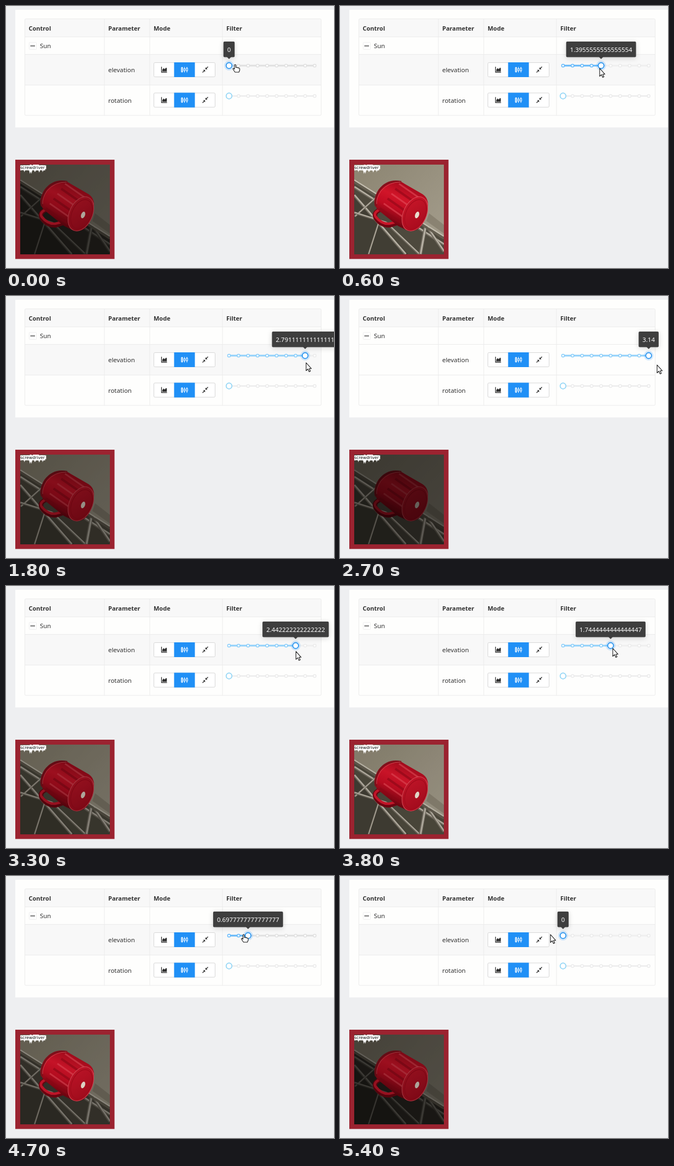
Recreate the animation shown at these times as an HTML page. Size 600 px wide and 479 px high, loop 5.5 s.

```html
<!DOCTYPE html>
<html lang="en">
<head>
<meta charset="utf-8">
<title>Light filter</title>
<style>
  html, body { margin: 0; width: 100%; height: 100%; overflow: hidden; background: #eeeff1; }
  svg { display: block; width: 600px; height: 479px; }
  text { font: 11.4px "Noto Sans", "Open Sans", sans-serif; fill: #303030; }
  .head text { font-size: 11px; font-weight: 600; }
  .line { fill: none; stroke: #ebebeb; }
  .rail { stroke: #efefef; stroke-width: 3; stroke-linecap: round; }
  .hover .rail { stroke: #e0e0e0; }
  .track { stroke: #91d2fc; stroke-width: 3; stroke-linecap: round; }
  .dot { fill: #fff; stroke: #ebebeb; stroke-width: 1.5; }
  .hover .dot { stroke: #e0e0e0; }
  .dot.on { stroke: #8acefa; }
  .strong .track, .strong .dot.on { stroke: #64b9fb; }
  .handle { fill: #fff; stroke: #91d5f5; stroke-width: 1.7; }
  .bubble { filter: drop-shadow(0 2px 5px rgba(0, 0, 0, .16)); }
  .bubble text { fill: #fff; }
  .pointer path { fill: #fff; stroke: #161616; stroke-width: 1.1; stroke-linejoin: round; }
  .label { font: 7.7px "DejaVu Sans", sans-serif; fill: #111; stroke: #fff; stroke-width: 5; paint-order: stroke; }
</style>
</head>
<body>
<svg viewBox="0 0 600 479">
  <defs>
    <clipPath id="photo"><rect x="26" y="290" width="164" height="164"/></clipPath>
    <path id="body" d="M96 320Q108 318 118 325L151 344Q162 351 161 367Q159 391 146 405Q136 414 124 411L106 402L71 374Q62 367 65 354Q71 328 96 320Z"/>
    <clipPath id="bodyClip"><use href="#body"/></clipPath>
    <linearGradient id="enamel" gradientUnits="userSpaceOnUse" x1="116" y1="325" x2="86" y2="392">
      <stop offset="0" stop-color="#a50b1c"/><stop offset=".35" stop-color="#cb1428"/>
      <stop offset=".65" stop-color="#b90c20"/><stop offset="1" stop-color="#6e0510"/>
    </linearGradient>
    <linearGradient id="surface" gradientUnits="userSpaceOnUse" x1="60" y1="290" x2="180" y2="410">
      <stop offset="0" stop-color="#8e8774"/><stop offset="1" stop-color="#a19a89"/>
    </linearGradient>
    <linearGradient id="base" x1="0" y1="0" x2="1" y2="1">
      <stop offset="0" stop-color="#c51629"/><stop offset="1" stop-color="#9f0a1b"/>
    </linearGradient>
    <g id="modes">
      <rect x="270.5" y="103.5" width="112" height="26" rx="2" fill="#fff" stroke="#d6d6d6"/>
      <rect x="307.5" y="103" width="38" height="27" fill="#2090f6"/>
      <path d="M284.5 111v10h10" fill="none" stroke="#303030" stroke-width="1.3"/>
      <path d="M286 119.5v-3l2.3-3 2 2 2.7-3 1.2 1.6v5.4Z" fill="#303030"/>
      <g fill="none" stroke="#fff">
        <path d="M322 111.5v10M326.5 111.5v3m0 4v3M331 111.5v2m0 5v3"/>
        <path d="M320.8 112.5h2.4v8h-2.4ZM325.3 114.5h2.4v4h-2.4ZM329.8 113.5h2.4v5h-2.4Z"/>
      </g>
      <path d="M369.5 111l-3.8 3.8M359.5 121.5l3.8-3.8" stroke="#303030" stroke-width="1.3"/>
      <path d="M364.8 112v3.7h3.7ZM364.2 120.5v-3.7h-3.7Z" fill="#303030"/>
    </g>
  </defs>

  <rect width="600" height="479" fill="#eeeff1"/>
  <rect x="17" y="7" width="583" height="215" fill="#fefefd"/>
  <rect x="34" y="24" width="542" height="32" fill="#f8f8f8"/>
  <rect id="row" x="34" y="89" width="542" height="55" fill="#f8f8f8"/>
  <rect class="line" x="34.5" y="23.5" width="542" height="176.5" rx="2"/>
  <path class="line" d="M34 56.5H576M34 88.5H576M34 144.5H576M180 24V200M263 24V200M396 24V200"/>
  <g class="head">
    <text x="41.5" y="45">Control</text><text x="187" y="45">Parameter</text>
    <text x="270" y="45">Mode</text><text x="403" y="45">Filter</text>
  </g>
  <rect x="42.5" y="66.500" width="13" height="13" rx="1" fill="#fff" stroke="#eee"/>
  <path d="M44.500 73h8.500" stroke="#333" stroke-width="1.3"/>
  <text x="62" y="77">Sun</text>
  <text x="187" y="121">elevation</text><text x="187" y="177">rotation</text>
  <use href="#modes"/><use href="#modes" y="55.500"/>
  <g id="elevation"></g>
  <g id="rotation"></g>

  <rect x="17" y="281" width="181.500" height="181.500" fill="#9b2330"/>
  <g clip-path="url(#photo)">
    <g id="floor">
      <rect x="26" y="290" width="164" height="164" fill="#4d493d"/>
      <path d="M26 342L125 454H26Z" fill="#413e34"/>
      <g id="truss" fill="none"></g>
    </g>
    <g id="table">
      <path d="M26 290H190V420L26 317Z" fill="url(#surface)"/>
      <path d="M26 318L190 421" stroke="#c3bdae" stroke-width="2.500"/>
      <path d="M26 322L190 425" stroke="#645e50" stroke-width="4"/>
      <path d="M158 393L190 416V400L163 379Z" fill="#766e5e" opacity=".5"/>
    </g>
    <g id="mug">
      <path d="M72 373Q61 378 65 387Q75 402 91 401L107 396" fill="none" stroke="#6d0511" stroke-width="8" stroke-linecap="round"/>
      <path d="M71 373Q61 378 65 385Q76 399 90 398L106 394" fill="none" stroke="#c31629" stroke-width="4.500" stroke-linecap="round"/>
      <use href="#body" fill="url(#enamel)"/>
      <g id="stripes" clip-path="url(#bodyClip)"></g>
      <path d="M66 366Q62 353 72 337Q87 317 112 322" fill="none" stroke="#82101b" stroke-width="4"/>
      <path d="M67 362Q66 351 75 338Q90 321 111 322" fill="none" stroke="#d44450" stroke-width="1"/>
      <ellipse cx="137" cy="380" rx="21" ry="33" transform="rotate(25 137 380)" fill="url(#base)" stroke="#d8505b" stroke-width="1"/>
      <ellipse cx="138" cy="380.500" rx="17.500" ry="28" transform="rotate(25 138 380.500)" fill="none" stroke="#a60b1c" stroke-width="1.500"/>
      <ellipse cx="141" cy="382" rx="3.600" ry="6.300" transform="rotate(20 141 382)" fill="#e2d8c9"/>
    </g>
    <text class="label" x="26" y="297.500">screwdriver</text>
  </g>

  <g class="bubble" id="bubble">
    <rect y="65" height="28.500" rx="2" fill="#3e3e3e"/>
    <path d="M-4 93h8l-4 4Z" fill="#3e3e3e"/>
    <text y="84" text-anchor="middle"></text>
  </g>
  <g class="pointer" id="pointer">
    <path id="arrow" d="M0 0V14.500L3.300 11.500L5.500 16.500L7.800 15.500L5.600 10.700H9.500Z"/>
    <path id="hand" d="M-1 1Q0-1 1.500 1V5.500Q3 4.200 4 6Q5.500 4.900 6.500 6.600Q8.500 6 8.500 8V10.500L7 14H0L-3.500 9Q-4.500 7-2.700 7L-1 8.500Z"/>
  </g>
</svg>

<script>
const $ = id => document.getElementById(id);
const LOOP = 5500, STEP = 100, START = 408, GAP = 17.4;

const values = ["0", "0.34888888888888886", "0.6977777777777777", "1.0466666666666666",
  "1.3955555555555554", "1.7444444444444447", "2.093333333333333", "2.442222222222222",
  "2.791111111111111", "3.14"];

// Brightness of each part of the photo per slider stop
const light = {
  floor: [.32, .42, .65, .87, 1, .94, .84, .72, .62, .5],
  table: [.5, .57, .7, .88, 1, .92, .82, .72, .61, .43],
  mug: [.77, .86, .97, 1, 1.03, .99, .88, .77, .66, .45]
};

// Pointer path: time, x, y
const path = [[0, 419, 107], [600, 475, 114], [1200, 500, 117], [1800, 549, 122],
  [2400, 580, 126], [2900, 580, 126], [3400, 518, 118], [3800, 499, 114],
  [4000, 484, 113], [4700, 434.5, 107], [5400, 385, 107], [5500, 385, 107]];

function add(parent, tag, attrs) {
  const node = document.createElementNS("http://www.w3.org/2000/svg", tag);
  for (const name in attrs) node.setAttribute(name, attrs[name]);
  return parent.appendChild(node);
}

function slider(group, y, active) {
  const line = name => add(group, "path", { class: name, d: `M${START} ${y}H${START + 9 * GAP}` });
  line("rail");
  const track = line("track");
  const dots = values.map((_, i) => add(group, "circle", { class: "dot", cx: START + i * GAP, cy: y, r: 2.6 }));
  const halo = add(group, "circle", { cy: y, r: 9, fill: "#1890ff", opacity: active ? .18 : 0 });
  const handle = add(group, "circle", { class: "handle", cy: y, r: 5.3 });
  if (active) handle.style.stroke = "#2492ef";
  return stop => {
    const x = START + stop * GAP;
    track.setAttribute("d", `M${START} ${y}H${x}`);
    track.style.display = stop ? "" : "none";
    dots.forEach((dot, i) => dot.classList.toggle("on", stop > 0 && i <= stop));
    halo.setAttribute("cx", x);
    handle.setAttribute("cx", x);
  };
}

function bar(d, width) {
  add($("truss"), "path", { d, stroke: "#6f695d", "stroke-width": width });
  add($("truss"), "path", { d, stroke: "#b7b1a4", "stroke-width": width * .5, transform: "translate(.5 -.7)" });
}
bar("M26 331L190 436", 5);
bar("M26 346L120 454", 5);
bar("M66 350L27 385", 3.5);
bar("M26 378L84 396L145 454", 4);
bar("M70 398L52 454", 3);
bar("M156 405L147 454", 6);
bar("M160 405L190 449", 5);

for (let i = 0; i < 6; i++) {
  const x = 108 - i * 7, y = 325 + i * 9;
  add($("stripes"), "path", {
    d: `M${x} ${y}l56 39`, stroke: i % 2 ? "#8d0717" : "#e45460",
    "stroke-width": i % 2 ? 4 : 3, opacity: i % 2 ? .6 : .5
  });
}

const setElevation = slider($("elevation"), 109, true);
slider($("rotation"), 164.5, false)(0);
const bubbleText = $("bubble").querySelector("text");
const bubbleBox = $("bubble").querySelector("rect");

function pointerAt(time) {
  const i = path.findIndex(p => p[0] > time);
  const [t0, x0, y0] = path[i - 1], [t1, x1, y1] = path[i];
  const f = (time - t0) / (t1 - t0);
  return [x0 + (x1 - x0) * f, y0 + (y1 - y0) * f];
}

function draw(time) {
  const [x, y] = pointerAt(time);
  const stop = time < STEP ? 0 : Math.max(0, Math.min(9, Math.round((x - START) / GAP)));
  const onSlider = y < 112 && x > 400;

  setElevation(stop);
  $("elevation").classList.toggle("hover", onSlider);
  $("elevation").classList.toggle("strong", onSlider || time < 700);
  $("row").style.opacity = x < 576 ? 1 : 0;

  bubbleText.textContent = values[stop];
  const width = bubbleText.getComputedTextLength() + 14;
  bubbleBox.setAttribute("x", -width / 2);
  bubbleBox.setAttribute("width", width);
  $("bubble").setAttribute("transform", `translate(${START + stop * GAP})`);

  $("pointer").setAttribute("transform", `translate(${x} ${y})`);
  $("hand").style.display = onSlider ? "" : "none";
  $("arrow").style.display = onSlider ? "none" : "";

  for (const part in light) $(part).style.filter = `brightness(${light[part][stop]})`;
}

let shown = -1;
function tick() {
  const time = Math.floor(performance.now() % LOOP / STEP) * STEP;
  if (time !== shown) draw(shown = time);
  requestAnimationFrame(tick);
}
tick();
</script>
</body>
</html>
```
